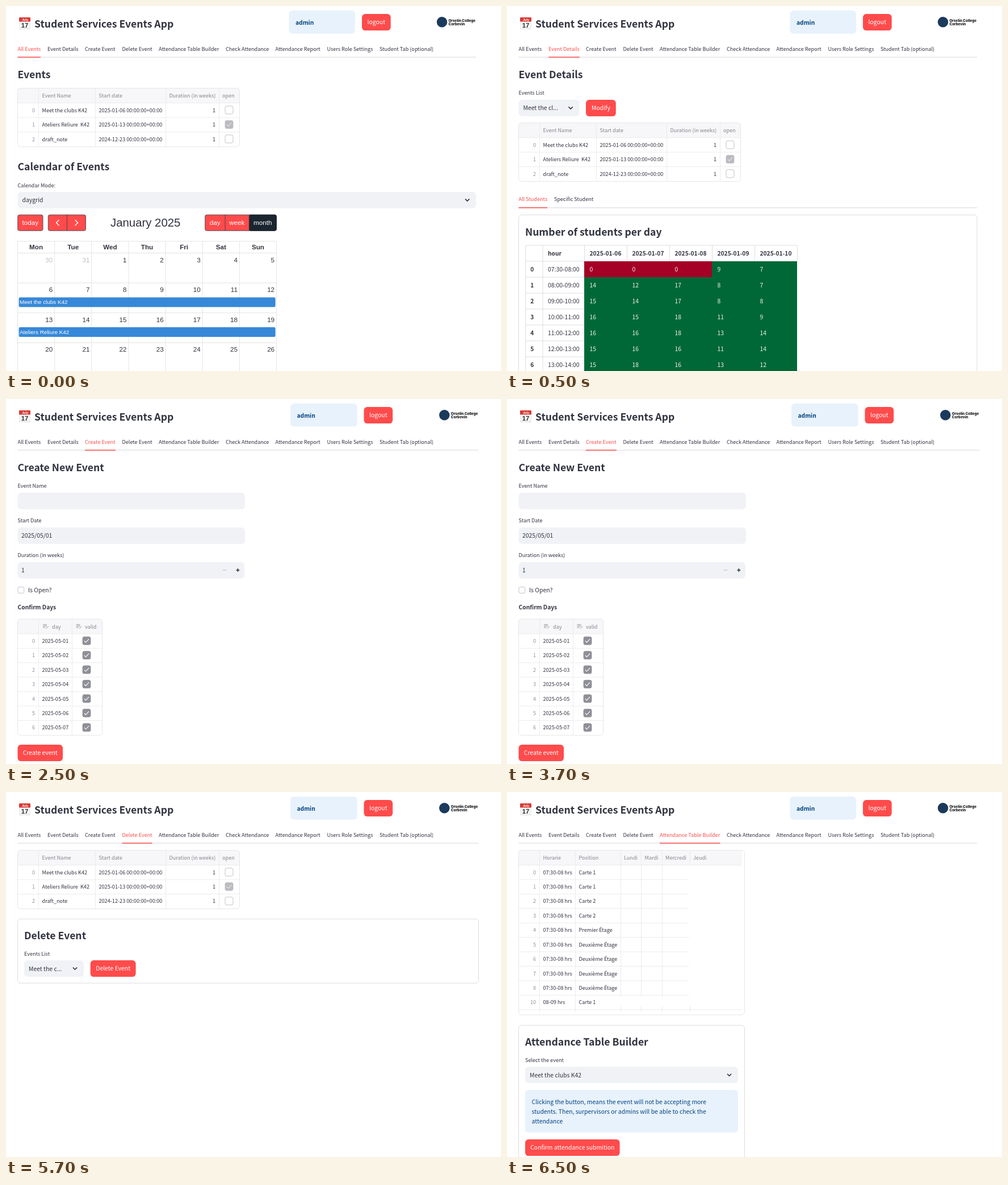
Write an HTML page that moves like this. It is 872x642 px and loops after 8000 ms.

```html
<!DOCTYPE html>
<html lang="en">
<head>
<meta charset="utf-8">
<title>Student Services Events App</title>
<style>
  html, body { margin: 0; width: 100%; height: 100%; overflow: hidden; background: #fff; }
  svg { display: block; width: 872px; height: 642px; }
  text { white-space: pre; font-family: 'Noto Sans CJK JP', 'Noto Sans CJK SC', 'Noto Sans CJK', 'Noto Sans', sans-serif; }
  .arial { font-family: 'Liberation Sans', Arial, sans-serif; }
  .brand { font-family: Inter, sans-serif; font-weight: 800; }
</style>
</head>
<body>
<svg id="stage" viewBox="0 0 872 642"></svg>
<script>
const INK = '#31333f', RED = '#ff4b4b', GREY = '#f0f2f6', MUTED = '#83848c', RULE = '#e7e7ea', NAVY = '#004280', PALE = '#e8f2fc';
const SMALL = 10.17, BASE = 11.63, HEAD = 19.95;
const ROW = 25.43;
const EVENTS = ['Meet the clubs K42', 'Ateliers Reliure  K42', 'draft_note'];
const STARTS = ['2025-01-06', '2025-01-13', '2024-12-23'];

const range = n => [...Array(n).keys()];
const each = (list, fn) => list.map(fn).join('');

// Text is placed by the vertical centre of its line.
function text(x, cy, str, size = SMALL, o = {}) {
  const font = size / 1.117 * (o.bold ? 0.985 : 1);
  return `<text x="${x}" y="${cy + size * 0.345}" font-size="${font}" fill="${o.fill || INK}"` +
    ` font-weight="${o.bold ? 600 : 400}" text-anchor="${o.anchor || 'start'}">${str}</text>`;
}

function arial(x, cy, str, size = BASE, o = {}) {
  return `<text class="arial" x="${x}" y="${cy + size * 0.36}" font-size="${size}" fill="${o.fill || INK}"` +
    ` font-weight="${o.bold ? 700 : 400}" text-anchor="${o.anchor || 'middle'}">${str}</text>`;
}

const rect = (x, y, x2, y2, fill, r = 0, stroke = 'none') =>
  `<rect x="${x}" y="${y}" width="${x2 - x}" height="${y2 - y}" rx="${r}" fill="${fill}" stroke="${stroke}" stroke-width=".8"/>`;
const path = (d, stroke = RULE, w = 0.8) =>
  `<path d="${d}" fill="none" stroke="${stroke}" stroke-width="${w}"/>`;
const hline = (y, x, x2, stroke, w) => path(`M${x} ${y}H${x2}`, stroke, w);
const vline = (x, y, y2, stroke, w) => path(`M${x} ${y}V${y2}`, stroke, w);

const heading = (x, cy, str) => text(x, cy, str, HEAD, { bold: true });
const frame = (x2, y, y2) => rect(20.5, y, x2, y2, 'none', 5.8, '#d3d4d8');

function button(x, y, x2, label) {
  return rect(x, y, x2, y + 29.1, RED, 5.8) +
    text((x + x2) / 2, y + 14.4, label, BASE, { fill: '#fff', anchor: 'middle' });
}

function select(x, y, x2, label) {
  const cx = x2 - 15.4, cy = y + 14.3;
  return rect(x, y, x2, y + 28.7, GREY, 5.8) + text(x + 8, cy, label, BASE) +
    path(`M${cx - 3.6} ${cy - 1.9}l3.6 3.6l3.6 -3.6`, INK, 1.6);
}

function tick(cx, cy, fill, mark = '#fff') {
  const box = rect(cx - 7, cy - 7, cx + 7, cy + 7, fill || '#fff', 2.8, fill || '#b4b4ba');
  return box + (fill ? path(`M${cx - 4.2} ${cy + .2}l2.7 2.8l5.6 -6`, mark, 1.1) : '');
}

// Outer frame, header band, column rules and row rules of a data grid.
function grid(top, cols, rows) {
  const x2 = cols[cols.length - 1], head = top + 26, bottom = head + rows * ROW;
  return rect(20.5, top, x2, head, '#f7f7f9', 4) +
    each(cols.slice(0, -1), x => vline(x, top, bottom)) +
    each(range(rows), i => hline(head + i * ROW, 20.5, x2)) +
    rect(20.5, top, x2, bottom + .6, 'none', 5, '#e0e0e4');
}

const index = (cy, n) => text(51, cy, n, SMALL, { fill: '#92939a', anchor: 'end' });
const title = (x, cy, str) => text(x, cy, str, SMALL, { fill: MUTED });

function eventTable(top) {
  const heads = [[63.5, 'Event Name'], [163.5, 'Start date'], [287.5, 'Duration (in weeks)'], [381, 'open']];
  return grid(top, [57.5, 157.5, 281.5, 375.5, 411.5], 3) +
    each(heads, ([x, s]) => title(x, top + 13, s)) +
    each(EVENTS, (name, i) => {
      const cy = top + 38.5 + i * ROW;
      return index(cy, i) + text(63.5, cy, name) + text(163.5, cy, STARTS[i] + ' 00:00:00+00:00') +
        text(369, cy, 1, SMALL, { anchor: 'end' }) + tick(393, cy - .2, i === 1 && '#bbbbc0', '#e6e6e9');
    });
}

const TABS = [['All Events', 20.5, 61], ['Event Details', 73, 128], ['Create Event', 139, 193],
  ['Delete Event', 204.5, 257.5], ['Attendance Table Builder', 269, 375.5], ['Check Attendance', 387, 463],
  ['Attendance Report', 474.5, 554], ['Users Role Settings', 565.5, 646.5], ['Student Tab (optional)', 658, 753]];

function tabs(list, active, cy, right) {
  const y = cy + 15, [, x, x2] = list[active];
  return hline(y, 20.5, right, '#e3e4e8', 1.4) + hline(y, x, x2, RED, 1.5) +
    each(list, ([s, tx], i) => text(tx, cy, s, SMALL, { fill: i === active ? RED : INK }));
}

function calendarIcon() {
  return rect(23, 20.5, 43, 41, '#e4e5e6', 1.5) + rect(23.5, 27, 42.5, 39.5, '#f5f5f5', .8) +
    rect(23, 20, 43, 27.5, '#d73b37', 1.2) +
    arial(33.5, 23.6, 'July', 5.6, { fill: '#fff', bold: true }) +
    arial(33, 34, '17', 11.4, { fill: '#333', bold: true });
}

function header(active, wide) {
  const right = wide ? 832.5 : 828, dx = wide ? 3.5 : 0, logo = wide ? 4.3 : 0;
  const a = wide ? 501 : 498.5, a2 = wide ? 618.7 : 615;
  return calendarIcon() + heading(50, 31, 'Student Services Events App') +
    rect(a, 8, a2, 48.5, PALE, 5.8) + text(a + 11.5, 28.8, 'admin', BASE, { fill: NAVY, bold: true }) +
    button(627 + dx, 14, 677.7 + dx, 'logout') +
    `<circle cx="${768 + logo}" cy="28.3" r="9.2" fill="#1b3a5c"/>` +
    each(['Orselin College', 'Corbevin'], (s, i) =>
      `<text class="brand" x="${779.5 + logo}" y="${27.9 + i * 6.2}" font-size="6.3" fill="#111">${s}</text>`) +
    tabs(TABS, active, 75, right);
}

function toolbar() {
  const edge = '#2c3e50', white = { fill: '#fff' };
  const box = (x, x2, fill = RED) => rect(x, 367.3, x2, 395.2, fill, 2.9, edge);
  return box(20.7, 65) + arial(42.8, 381, 'today', BASE, white) +
    box(74.3, 140.5) + vline(107.4, 367.3, 395.2, edge) +
    path('M93.5 376.2l-5 5l5 5M121.5 376.2l5 5l-5 5', '#fff', 1.5) +
    arial(245.7, 381, 'January 2025', 20.35) +
    box(350.7, 476.3) + rect(428.5, 367.3, 476.3, 395.2, '#1a252f', 2.9, '#151e27') +
    vline(386, 367.3, 395.2, edge) + vline(428.3, 367.3, 395.2, edge) +
    each([[368.2, 'day'], [406.8, 'week'], [452.2, 'month']], ([x, s]) => arial(x, 381, s, BASE, white));
}

function calendar() {
  const step = 65.14, left = 20.5, top = 434.5, h = 52.6, line = '#ddd';
  const days = ['Mon', 'Tue', 'Wed', 'Thu', 'Fri', 'Sat', 'Sun'];
  return hline(413.9, left, 476.5, line) +
    each(range(4), r => hline(top + r * h, left, 476.5, line)) +
    each(range(8), c => vline(left + c * step, 413.9, 642, line)) +
    each(days, (d, c) => arial(left + (c + .5) * step, 424, d, BASE, { bold: true })) +
    each(range(28), i => {
      const past = i < 2, x = left + (i % 7 + 1) * step - 3.4, cy = top + Math.floor(i / 7) * h + 12;
      return arial(x, cy, past ? 30 + i : i - 1, BASE, { anchor: 'end', fill: past ? '#c1c1c5' : INK });
    }) +
    each(range(2), i => {
      const y = top + (i + 1) * h + 25.4, label = EVENTS[i].replace('  ', ' ');
      return rect(22.6, y, 474.6, y + 17, '#3788d8', 2.3) + arial(24, y + 8.4, label, 9.88, { anchor: 'start', fill: '#fff' });
    });
}

const allEvents = () => header(0) + heading(20.5, 120, 'Events') + eventTable(144.7) +
  heading(20.5, 282, 'Calendar of Events') + text(20.5, 315, 'Calendar Mode:') +
  select(20.5, 327, 828, 'daygrid') + toolbar() + calendar();

function studentTable() {
  const xs = [32.5, 63, ...range(6).map(i => 136.5 + i * 75)], line = '#d5d6d9';
  const counts = [[0, 0, 0, 9, 7], [14, 12, 17, 8, 7], [15, 14, 17, 8, 8], [16, 15, 18, 11, 9],
    [16, 16, 18, 13, 14], [15, 16, 16, 11, 14], [15, 18, 16, 13, 12]];
  const hour = i => String(i).padStart(2, '0') + ':00';
  return hline(421, 32.5, 511.5, line) + each(xs, x => vline(x, 421, x < 137 ? 642 : 449, line)) +
    text(72, 435, 'hour', BASE, { bold: true }) +
    each(range(5), c => text(145.5 + c * 75, 435, '2025-01-' + String(6 + c).padStart(2, '0'), BASE, { bold: true })) +
    each(counts, (row, r) => {
      const y = 449 + r * 28, cy = y + 14;
      return hline(y, 32.5, 136.5, line) +
        text(44.2, cy, r, BASE, { bold: true, anchor: 'middle' }) +
        text(72, cy, (r ? hour(7 + r) : '07:30') + '-' + hour(8 + r), BASE) +
        each(row, (n, c) => rect(136 + c * 75, y, 211 + c * 75, y + 28, n ? '#006837' : '#a50026') +
          text(145.5 + c * 75, cy, n, BASE, { fill: '#f1f1f1' }));
    });
}

const details = () => header(1) + heading(20.5, 120, 'Event Details') + text(20.5, 152.5, 'Events List') +
  select(20.5, 165, 127.5, 'Meet the cl...') + button(139, 165, 191.8, 'Modify') + eventTable(205.7) +
  tabs([['All Students', 20.5, 71], ['Specific Student', 83, 152]], 0, 339.7, 828) +
  frame(828, 367.5, 660) + heading(32, 397, 'Number of students per day') + studentTable();

const editIcon = (x, cy) =>
  path(`M${x} ${cy - 3.2}h7M${x} ${cy - .6}h7M${x} ${cy + 2}h4M${x + 5.6} ${cy + 3.8}l4.2 -4.2`, '#8b8c93', 1);

const create = () => header(2, true) + heading(20.5, 120, 'Create New Event') +
  each(['Event Name', 'Start Date', 'Duration (in weeks)'], (s, i) =>
    text(20.5, 152.6 + i * 61.1, s) + rect(20.5, 165 + i * 61, i < 2 ? 421 : 420, 193.7 + i * 61, GREY, 5.8)) +
  text(27, 240.4, '2025/05/01', BASE) + text(27, 301.3, '1', BASE) +
  hline(301, 382, 388, '#bfc0c6', 1.1) + path('M405.4 301h6M408.4 298v6', INK, 1.5) +
  rect(20.9, 330.6, 31.8, 341.5, '#fff', 2.6, '#b3b4ba') + text(39, 336.4, 'Is Open?', BASE) +
  text(20.5, 365.6, 'Confirm Days', BASE, { bold: true }) +
  grid(387, [57.5, 116.5, 169.5], 7) +
  editIcon(65, 400) + title(81, 400, 'day') + editIcon(123.5, 400) + title(139, 400, 'valid') +
  each(range(7), i => {
    const cy = 425.4 + i * ROW;
    return index(cy, i) + text(63.5, cy, '2025-05-0' + (i + 1)) + tick(142, cy - .2, '#8f9097');
  }) +
  button(20.5, 608, 100, 'Create event');

const remove = () => header(3, true) + eventTable(102.6) + frame(832.5, 223.3, 336.2) +
  heading(32, 252.5, 'Delete Event') + text(32, 284.7, 'Events List') +
  select(32, 296.2, 137, 'Meet the c...') + button(148.7, 296, 228.6, 'Delete Event');

function scheduleTable() {
  const heads = [[63.5, 'Horarie'], [126.5, 'Position'], [206, 'Lundi'], [242.5, 'Mardi'], [279, 'Mercredi'], [328, 'Jeudi']];
  const places = ['Carte 1', 'Carte 1', 'Carte 2', 'Carte 2', 'Premier Étage',
    ...Array(4).fill('Deuxième Étage'), 'Carte 1'];
  return rect(20.5, 102.6, 414, 128.6, '#f7f7f9', 4) + rect(20.5, 102.6, 418.5, 392, 'none', 5, '#e0e0e4') +
    each(heads, ([x, s]) => title(x, 115.6, s)) +
    each([57.5, 120.5], x => vline(x, 102.6, 387.5)) +
    each([200.5, 236.5, 273.5], x => vline(x, 102.6, 361) + vline(x, 375.5, 387.5)) +
    vline(322.5, 102.6, 128.6) + vline(322.5, 375.5, 387.5) + hline(128.6, 20.5, 414) +
    each(places, (p, i) => {
      const cy = 141.1 + i * ROW, last = i === 9;
      return index(cy, last ? 10 : i) + text(63.5, cy, last ? '08-09 hrs' : '07:30-08 hrs') + text(126.5, cy, p) +
        hline(cy + 12.8, 20.5, last ? 414 : 320.5);
    });
}

const builder = () => header(4) + scheduleTable() + frame(418.5, 410.3, 660) +
  heading(32, 439.5, 'Attendance Table Builder') + text(32, 471.7, 'Select the event') +
  select(32, 483.4, 407, EVENTS[0]) + rect(32, 524, 407, 599, PALE, 5.8) +
  each(['Clicking the button, means the event will not be accepting more',
    'students. Then, surpervisors or admins will be able to check the', 'attendance'],
    (s, i) => text(43.5, 544.5 + i * 17.45, s, BASE, { fill: NAVY })) +
  button(32, 611, 198.6, 'Confirm attendance submition');

const LOOP = 8000;
const starts = [0, 500, 2500, 4500, 6500];
const stage = document.getElementById('stage');
stage.innerHTML = each([allEvents, details, create, remove, builder], page => `<g display="none">${page()}</g>`);
const pages = [...stage.children];
const t0 = performance.now();

function draw(now) {
  const t = Math.max(0, now - t0) % LOOP;
  const current = starts.filter(s => s <= t).length - 1;
  pages.forEach((p, i) => p.setAttribute('display', i === current ? 'inline' : 'none'));
  requestAnimationFrame(draw);
}
draw(t0);
</script>
</body>
</html>
```
